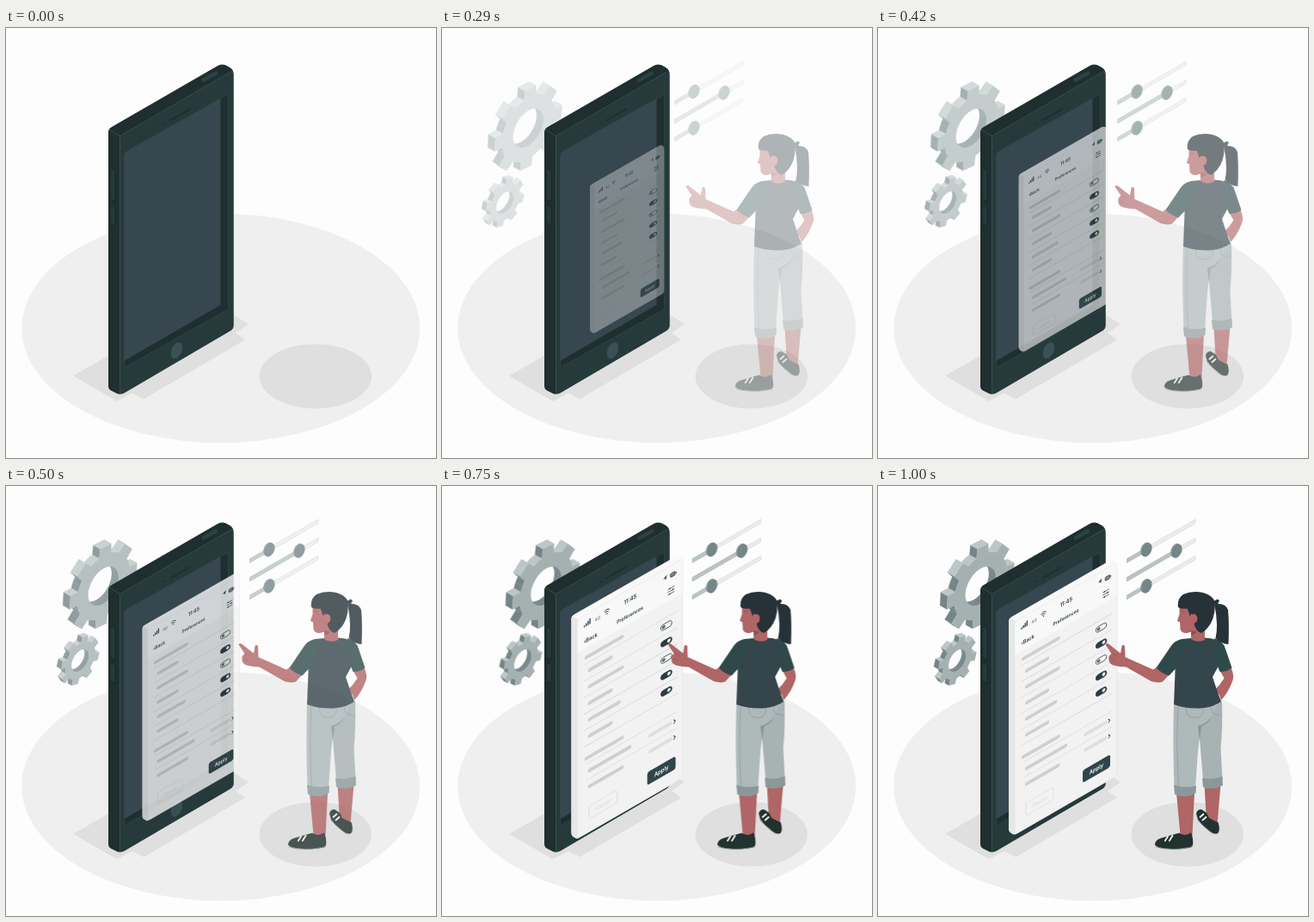
These frames come from a looping animation (500 px wide and 500 px high, 1040 ms). An HTML page:

```html
<!DOCTYPE html>
<html lang="en">
<head>
<meta charset="utf-8">
<title>Preferences</title>
<style>
  html, body { margin: 0; width: 100%; height: 100%; overflow: hidden; background: #fdfdfd; }
  svg { display: block; width: 100vw; height: 100vh; }
  text { font-family: Inter, Roboto, sans-serif; font-weight: 600; text-anchor: middle; }
  #panel { transform-origin: 215px 245.5px; }
  .skin { fill: #b06566; }
  .line { fill: none; stroke-linecap: round; stroke-linejoin: round; }
</style>
</head>
<body>
<svg viewBox="0 0 500 500">
  <!-- floor -->
  <ellipse cx="249.7" cy="349" rx="231.5" ry="133.2" fill="#efefef"/>
  <ellipse cx="359.8" cy="405" rx="65.2" ry="37.5" fill="#dfdfdf"/>
  <path d="M78 404.5L119 381 265 333.5 282 344.5 267 354.5 278 362.5 160 431.5 147 424.5 129 434Z" fill="#dfdfdf"/>

  <g id="gears"></g>
  <g id="sliders"></g>

  <g id="phone">
    <path d="M119 121Q119 117.500 123 115L246 44Q251 41.500 256 43.500L260.500 46Q264.500 48.500 264.500 53V346Q264.500 350 260.500 352.300L138 424Q133 427 129 425L122 421.500Q119 420 119 416Z" fill="#1f2e2f"/>
    <path d="M132.500 129Q132.500 126 135 124.500L259 52.500Q264.500 49.500 264.500 54V346Q264.500 350 260.500 352.300L138 424Q132.500 427 132.500 423Z" fill="#263a3b"/>
    <path class="line" d="M120.500 118.500L132.500 125.500 263 50M132.500 126V424" stroke="#4a5f60" stroke-width=".6"/>
    <path d="M137.500 149Q137.500 145 141 143L255 79Q258.500 77 258.500 81V324Q258.500 327 256 328.500L140 393.500Q137.500 395 137.500 392Z" fill="#1f2e2f" stroke="#3b5051" stroke-width=".5"/>
    <path d="M137.500 149Q137.500 145 141 143L249.500 82V322L137.500 387Z" fill="#37474f"/>
    <path class="line" d="M191 107.500L213.500 94.500M184.500 111.300L185.500 110.700" stroke="#1f2e2f" stroke-width="1.9"/>
    <ellipse cx="198.500" cy="375" rx="6" ry="10" transform="rotate(24 198.500 375)" fill="#3b5055"/>
    <path class="line" d="M229.500 60.500L244 52.500" stroke="#2b4142" stroke-width="4.500"/>
    <path d="M121.500 163.500L127 165.500V201.500L121.500 199ZM121.500 206L127 208V229L121.500 226.500Z" fill="#263a3b" stroke="#16282a" stroke-width=".6" stroke-linejoin="round"/>
  </g>

  <g id="panel">
    <path d="M152 158Q152 154 155.500 152L270 86.500Q273.500 84.500 276.500 87Q278 88.500 278 91V333Q278 337 274.500 339L162 404Q158.500 406.500 155.500 404L153.500 402.500Q152 401 152 398Z" fill="#f9f9f9"/>
    <path d="M152 158Q152 155.500 153.200 154L160.500 157.500 159.500 405.300Q156.500 405 155.500 404L153.500 402.500Q152 401 152 398Z" fill="#e7e7e7"/>
    <g id="face" transform="skewY(-30)">
      <rect x="159" y="249.500" width="119" height="247.500" rx="4" fill="#f2f2f2" stroke="#e4e4e4" stroke-width=".6"/>
      <path d="M159.300 288V253.500Q159.300 249.800 163 249.800H274Q277.700 249.800 277.700 253.500V288Z" fill="#f8f8f8"/>
    </g>
  </g>

  <g id="person">
    <!-- legs and shoes -->
    <path class="skin" d="M347 357H368L365.500 406H351.500ZM379.500 347H398.500L394.500 393 382 391Z"/>
    <path d="M370 381Q371 376 376 376L382 380 385 386Q392 390 395.500 391Q398.500 400 395 404Q390 406 383 399Q376 394 372 388Z" fill="#22322f"/>
    <path d="M322 417.500Q322 411.500 329 409.500L339 406.500 350 403.500Q357 408 364 403Q367 410 366 418Q364 421.500 350 422Q328 423 322 417.500Z" fill="#22322f"/>
    <path class="line" d="M323 419.500Q332 423 350 422.200L365 420M371.500 388Q382 400 390 404.500" stroke="#7f8d8f" stroke-width=".9"/>
    <path class="line" d="M337 407.500L333.800 412.500M342.500 406.500L338.800 412.500M378.500 381.500L374.500 385M381.500 385L377.500 388.500" stroke="#fafafa" stroke-width="1.800"/>
    <!-- trousers -->
    <path d="M372 262L400 250Q401 280 398.500 305L400.500 342Q389 347 378 342L374.500 300 372.500 275Z" fill="#a7b2b3"/>
    <path d="M344 252L396 254 384 272 376 279Q374 290 372 308L369 352Q357 355 344.500 350Q342.500 300 344 252Z" fill="#aeb9ba"/>
    <path d="M372 279Q379 278 387 270Q383 277 376 279.500L374 296Z" fill="#87959a"/>
    <path d="M344 347.500Q356 352 370 348.500L369.500 357Q358 364 345 358.500ZM377 339.500Q389 342 400.500 337.500L401 348Q390 354.500 378 350Z" fill="#8b9899"/>
    <path class="line" d="M348.800 258Q346.500 300 349.500 349M358.500 258Q358 265 362 268Q369 271 375 268Q379 264 378.500 259M387 258Q387 263 391 265L399.500 267" stroke="#8f9c9e" stroke-width=".8"/>
    <!-- arm on the hip -->
    <path class="skin" d="M396 212L410.500 211Q414.500 221 412.500 226Q407.500 240 399 249L397 243 391.500 237Q398 231 402.500 223.500Z"/>
    <!-- pointing arm -->
    <path class="skin" d="M325 210L339 219 331 227.500Q326 229.500 318 227.300L288.500 210.500Q281 210.500 274 208.500Q268 206.500 268.500 201Q267.500 198 271.500 195L264.500 184.500Q265 182 268 183.500L278 191.500 282 194.500 283.500 186Q285.500 183.500 287 186.500L287.500 199 320 213.500Z"/>
    <path class="line" d="M272 195Q276 196 278 198M269 201Q273 201 275 203" stroke="#964f53" stroke-width=".6"/>
    <!-- shirt -->
    <path d="M364 177Q352 177 345 185L345.500 216 344 254Q357 259 375 258.500Q391 257 399 250.500L395 240 389 222 395.500 210 403 186Q396 177 380 176.500Z" fill="#34454c"/>
    <path d="M357 177.500Q346 178.500 341.500 185L323.500 211.500Q330 218 338.500 220.500L351 207Q358 191 357 177.500ZM391 177Q400.500 180 403.500 188L411.500 211.500Q406 216 397.500 216L393 205Z" fill="#2f494b"/>
    <!-- head -->
    <path class="skin" d="M364 165H380V179Q371 183 364 178Z"/>
    <path class="skin" d="M350.500 139L350.500 149 348 156.500Q348.500 158 351 158L351.500 167Q353.500 171.500 359 171L366 169 375 160 372 139Z"/>
    <path d="M364 168L371 169.500Q367 174 364 173Z" fill="#914d50"/>
    <path d="M349 141Q347.500 131 355 126Q365 121.500 378 124Q388.500 127 391.500 134Q392.500 145 389.500 154Q385 166 376 171Q370 169 368 162L365 148 362.500 151Q361.500 146 359.500 142.500Q352 143.500 349 141Z" fill="#263238"/>
    <ellipse class="skin" cx="367" cy="154.500" rx="4.3" ry="5.700" transform="rotate(12 367 154.500)"/>
    <path class="line" d="M353 146L356 145.600" stroke="#8a4b4f" stroke-width=".7"/>
    <path d="M390 134L395 131.500 397 133.500 395 137Q404 136.500 407 144Q408.500 160 407.500 184Q399 183.500 392.500 177Q396 163 391.500 139Z" fill="#263238"/>
  </g>
</svg>

<script>
const NS = 'http://www.w3.org/2000/svg';
const $ = id => document.getElementById(id);
const SLOPE = Math.tan(Math.PI / 6);

function add(parent, tag, attrs, text) {
  const el = document.createElementNS(NS, tag);
  for (const k in attrs) el.setAttribute(k, attrs[k]);
  if (text) el.textContent = text;
  return parent.appendChild(el);
}

// ---- gears: a toothed outline in an isometric plane, extruded up and left
const toPath = pts => 'M' + pts.map(p => p[0].toFixed(2) + ' ' + p[1].toFixed(2)).join('L') + 'Z';

function gear(cx, cy, outer, root, hole, teeth, start, dx, dy) {
  const iso = (r, deg) => {
    const a = deg * Math.PI / 180, x = r * Math.cos(a);
    return [cx + .866 * x, cy + r * Math.sin(a) - .5 * x];
  };
  const rim = [], ring = [], step = 360 / teeth;
  for (let i = 0; i < teeth; i++) {
    const c = start + i * step;
    rim.push(iso(root, c - step * .29), iso(outer, c - step * .21),
             iso(outer, c + step * .21), iso(root, c + step * .29), iso(root, c + step * .5));
  }
  for (let a = 360; a > 0; a -= 10) ring.push(iso(hole, a));

  const wall = (pts, inner) => pts.forEach((p, i) => {
    const q = pts[(i + 1) % pts.length];
    const ex = q[0] - p[0], ey = q[1] - p[1];
    if (ey * dx - ex * dy <= 0) return;
    const up = ex > Math.abs(ey) * .6;
    const fill = inner ? '#74858a' : up ? '#bcc6c6' : '#748587';
    add($('gears'), 'path', {
      d: toPath([p, q, [q[0] + dx, q[1] + dy], [p[0] + dx, p[1] + dy]]),
      fill, stroke: fill, 'stroke-width': .3
    });
  });
  wall(rim, false);
  wall(ring, true);
  add($('gears'), 'path', { d: toPath(rim) + toPath(ring), fill: '#a5b0b1', 'fill-rule': 'evenodd' });
}
gear(119.3, 116.5, 45.5, 35.5, 20.5, 8, 184, -8, -4.6);
gear(92.3, 203, 26, 20, 11.8, 8, 16, -5, -2.9);

// ---- slider rails with their knobs
for (const [y, knob] of [[87.2, 312], [108.8, 347], [129.6, 312]]) {
  const at = x => y - (x - 289) * SLOPE;
  const rail = (x1, x2, fill, stroke) => add($('sliders'), 'path', {
    d: `M${x1} ${at(x1) - 2.3}L${x2} ${at(x2) - 2.3}V${at(x2) + 2.3}L${x1} ${at(x1) + 2.3}Z`,
    fill, stroke, 'stroke-width': .6, 'stroke-linejoin': 'round'
  });
  rail(289.3, 369, '#ececec', '#cfd3d3');
  rail(289.3, knob, '#bac3c3', '#adb6b6');
  for (const [d, fill] of [[-.8, '#8b999b'], [.5, '#738688']]) {
    const x = knob + d, cy = at(knob) + d * .5;
    add($('sliders'), 'ellipse', { cx: x, cy, rx: 5.5, ry: 8.5, fill, transform: `rotate(24 ${x} ${cy})` });
  }
}

// ---- panel contents
const face = $('face'), DARK = '#2b3d43';
const stroke = (d, color, width, cap = 'round') =>
  add(face, 'path', { d, fill: 'none', stroke: color, 'stroke-width': width, 'stroke-linecap': cap });
const bar = (x1, x2, y, color = '#cfcfcf') => stroke(`M${x1 + 2} ${y}H${x2 - 2}`, color, 4.2);
const label = (x, y, size, text, fill = DARK) =>
  add(face, 'text', { transform: `translate(${x} ${y}) scale(.866 1)`, 'font-size': size, fill }, text);
const box = (x, y, width, height, rx, fill, edge = 'none') =>
  add(face, 'rect', { x, y, width, height, rx, fill, stroke: edge, 'stroke-width': .7 });
const dot = (cx, cy, r, fill) => add(face, 'circle', { cx, cy, r, fill });

for (let i = 0; i < 4; i++) box(166.3 + i * 2.1, 261 - i * 1.5, 1.3, 2 + i * 1.5, .3, DARK);
label(181.8, 263.6, 5.2, '4G', '#7c888b');
stroke('M189.700 259Q192.500 256 195.300 259M190.900 260.800Q192.500 259.200 194.100 260.800', DARK, .8);
dot(192.5, 262.5, .7, DARK);
label(218.8, 263.6, 6.8, '11:45');
add(face, 'path', { d: 'M256 260.300L260.300 257.500 259.200 262.400 258 260.600Z', fill: DARK });
box(264.2, 258.8, 5.4, 4.2, 1, '#7c888b', DARK);
stroke('M270.700 260.200V261.600', DARK, .7);

label(174, 281.4, 6.3, '‹Back');
label(218.5, 280.7, 5.9, 'Preferences');
for (let i = 0; i < 3; i++) {
  stroke(`M261.500 ${275 + i * 3}H268.500`, DARK, .6);
  dot(i === 1 ? 267 : 263.5, 275 + i * 3, .8, DARK);
}

const ROW = 18.6, FIRST = 314.5;
for (let i = 0; i < 6; i++) stroke(`M167 ${FIRST - 9.2 + i * ROW}H272`, '#d9d9d9', .8);
for (const y of [418.7, 437]) stroke(`M169 ${y}H272`, '#d9d9d9', .8);
bar(167, 211.5, 298.3);
[199, 211.5, 199, 208, 199].forEach((end, i) => {
  const y = FIRST + i * ROW, on = i !== 0 && i !== 2;
  bar(171, end, y);
  box(253.3, y - 3.2, 12.6, 6.4, 3.2, on ? DARK : '#f4f4f4', DARK);
  dot(on ? 262.5 : 256.6, y, 1.9, on ? '#f4f4f4' : '#5c6b70');
});
bar(167, 211.5, 412.5);
[[220, 428], [211.5, 446]].forEach(([end, y]) => {
  bar(171, end, y);
  bar(239.5, 266, y, '#dedede');
  stroke(`M268 ${y - 2}L269.700 ${y}L268 ${y + 2}`, DARK, .9);
});

box(172, 468, 32, 14.6, 2.5, 'none', '#dcdcdc');
label(188, 477.6, 6, 'Cancel', '#dcdcdc');
box(238, 468, 32, 14.6, 2.5, '#30464b');
label(254, 477.7, 6.7, 'Apply', '#fff');

// ---- motion: an overshooting ease sampled at 24 steps a second
const LOOP = 1040, STEPS = 25;
const bezier = (a, b, s) => 3 * (1 - s) ** 2 * s * a + 3 * (1 - s) * s * s * b + s ** 3;

function ease(t) {
  let lo = 0, hi = 1;
  for (let i = 0; i < 30; i++) {
    const mid = (lo + hi) / 2;
    if (bezier(.36, .5, mid) < t) lo = mid; else hi = mid;
  }
  return bezier(-.01, 1.38, lo);
}
const progress = n => n < 3 ? 0 : ease(Math.min(1, n / 24 + .03));

function play(id, pose) {
  const frames = [];
  for (let n = 0; n <= STEPS; n++) {
    const e = progress(Math.min(n, STEPS - 1));
    frames.push({
      offset: n === STEPS ? 1 : Math.round(n * 25 / 6) * 10 / LOOP,
      opacity: Math.max(0, Math.min(1, e)),
      transform: pose(e),
      easing: 'steps(1, end)'
    });
  }
  $(id).animate(frames, { duration: LOOP, iterations: Infinity });
}
const slide = from => e => `translateX(${from * (1 - e)}px)`;

play('gears', slide(-30));
play('sliders', slide(-30));
play('person', slide(30));
play('panel', e => `scale(${.5 + .5 * e})`);
</script>
</body>
</html>
```
